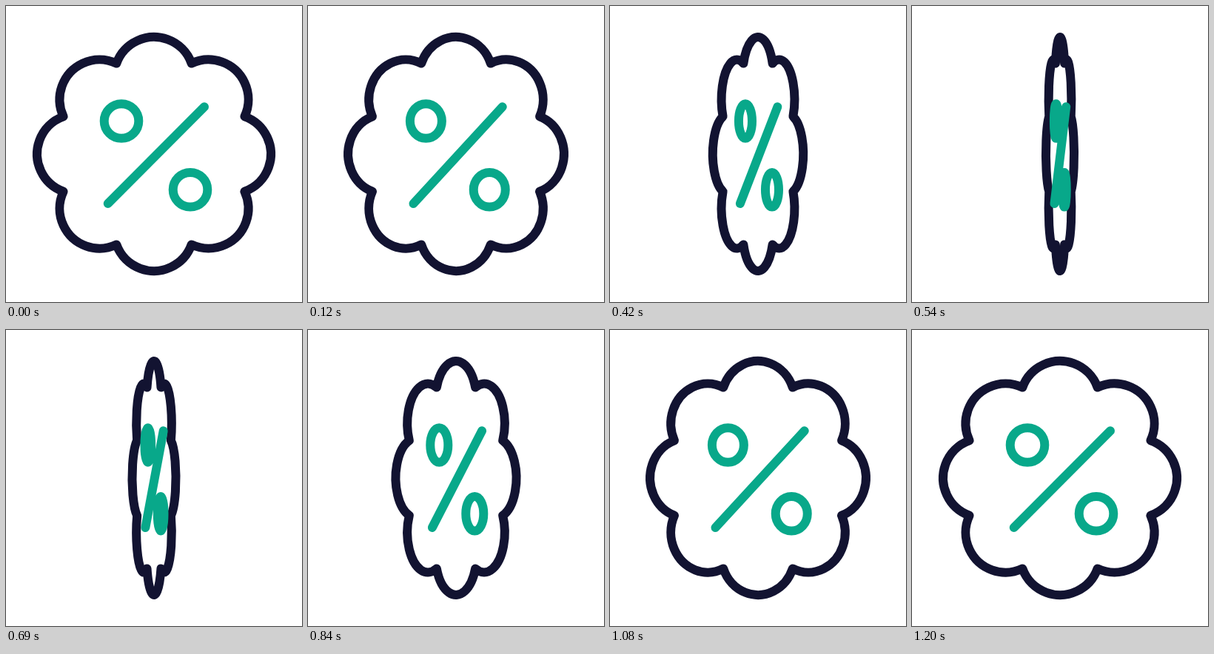
Write an HTML page with a canvas that moves like this. It is 400 px wide and 400 px high and loops after 1230 ms.

```html
<!DOCTYPE html>
<html lang="en">
<head>
<meta charset="utf-8">
<title>Discount badge</title>
<style>
  html, body { margin: 0; width: 100%; height: 100%; overflow: hidden; background: #fff; }
  canvas { display: block; width: 400px; height: 400px; }
</style>
</head>
<body>
<canvas id="stage" width="400" height="400"></canvas>
<script>
const ctx = document.getElementById('stage').getContext('2d');
const NAVY = '#121331', GREEN = '#08a88a';
const STEP = 30, FRAMES = 41, HALF = 20;

// Scalloped outline, centred on the origin: equal arcs meeting in cusps.
function scallop(lobes, apex, cusp) {
  const path = new Path2D();
  const sector = Math.PI / lobes;
  const chord = cusp * Math.sin(sector);
  const rise = apex - cusp * Math.cos(sector);
  const radius = (chord * chord + rise * rise) / (2 * rise);
  const reach = apex - radius;
  const spread = Math.atan2(chord, radius - rise);
  for (let i = 0; i < lobes; i++) {
    const a = 2 * sector * i;
    path.arc(reach * Math.cos(a), reach * Math.sin(a), radius, a - spread, a + spread);
  }
  path.closePath();
  return path;
}

function percent() {
  const path = new Path2D();
  for (const [x, y] of [[-44, -44.5], [49, 48.3]]) {
    path.moveTo(x + 23.3, y);
    path.arc(x, y, 23.3, 0, 2 * Math.PI);
    path.closePath();
  }
  path.moveTo(-62.3, 67);
  path.lineTo(68, -63.7);
  return path;
}

const badge = scallop(8, 158, 132.5);
const sign = percent();

const bezier = (a, b, u) => 3 * (1 - u) * (1 - u) * u * a + 3 * (1 - u) * u * u * b + u * u * u;

// Slow start, steady finish.
function ease(p) {
  let lo = 0, hi = 1;
  for (let i = 0; i < 30; i++) {
    const mid = (lo + hi) / 2;
    if (bezier(1 / 3, 5 / 6, mid) < p) lo = mid; else hi = mid;
  }
  return bezier(0, 5 / 6, lo);
}

// The geometry is squeezed sideways while the stroke keeps its width.
function strokeSqueezed(shape, squeeze, color) {
  const path = new Path2D();
  path.addPath(shape, new DOMMatrix([squeeze, 0, 0, 1, 200, 200]));
  ctx.strokeStyle = color;
  ctx.stroke(path);
}

function draw(now) {
  const frame = Math.floor(now / STEP) % FRAMES;
  const progress = 1 - Math.abs(frame - HALF) / HALF;
  const squeeze = Math.max(0.002, 1 - ease(progress));
  ctx.fillStyle = '#fff';
  ctx.fillRect(0, 0, 400, 400);
  ctx.lineWidth = 12;
  ctx.lineCap = ctx.lineJoin = 'round';
  strokeSqueezed(badge, squeeze, NAVY);
  strokeSqueezed(sign, squeeze, GREEN);
}

const start = performance.now();
function tick() {
  draw(performance.now() - start);
  requestAnimationFrame(tick);
}
tick();
</script>
</body>
</html>
```
